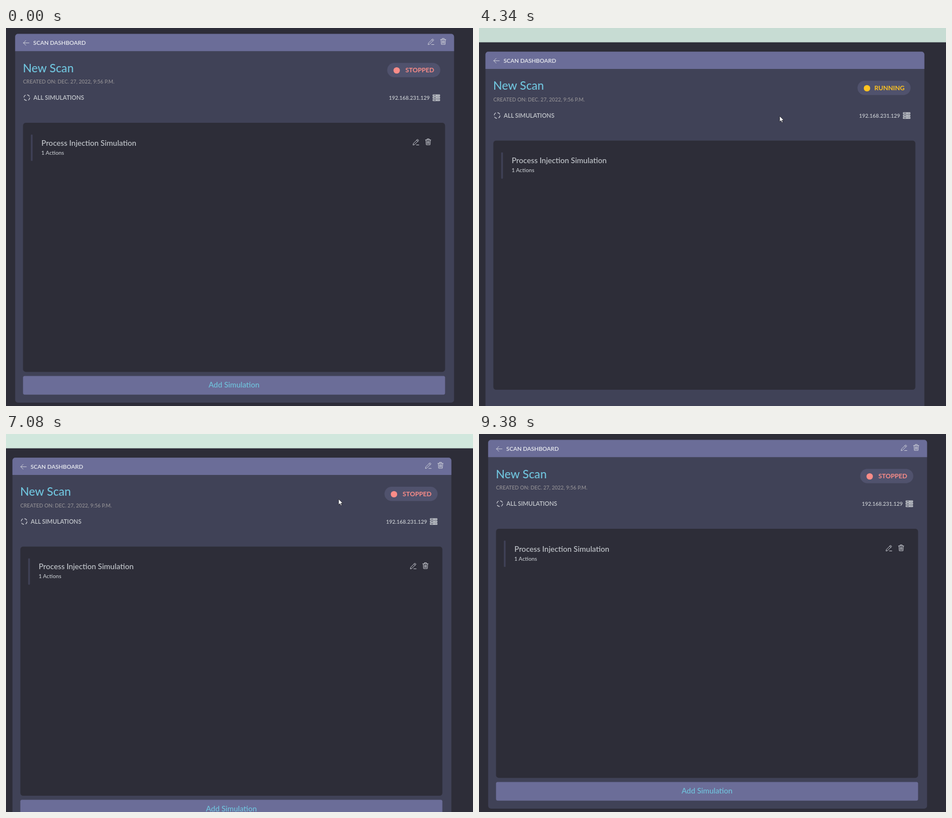
Recreate the animation shown at these times as an HTML page. Size 831 by 674 pixels, loop 9510 ms.

```html
<!DOCTYPE html>
<html lang="en">
<head>
<meta charset="utf-8">
<title>Scan dashboard</title>
<style>
  html, body { margin: 0; height: 100%; overflow: hidden; background: #2d2d38; }
  svg { display: block; width: 831px; height: 674px; }
  text { font: 500 10px Lato, "Open Sans", sans-serif; fill: #c5c9ce; }
  .label { font-weight: 600; }
  .accent { fill: #70c5de; }
  .end { text-anchor: end; }
  .line { fill: none; stroke: #d3d5dc; stroke-width: .9; stroke-linecap: round; stroke-linejoin: round; }
</style>
</head>
<body>
<svg viewBox="0 0 831 674">
  <defs>
    <g id="pencil" class="line">
      <path d="M0 10.5 .6 8 8 .6 10 2.6 2.6 10ZM6.5 2.1 8.5 4.1M6 10.7H10.3"/>
    </g>
    <g id="trash" class="line">
      <path d="M.5 2.4H10M3.4 2.2V.5H7.1V2.2M1.4 2.6 2 11H8.6L9.2 2.6M3.7 4.5V9M5.3 4.5V9M6.9 4.5V9"/>
    </g>
    <g id="tools">
      <use href="#pencil"/>
      <use href="#trash" x="21.5" y="-.6"/>
    </g>
    <g id="unit">
      <rect width="13" height="3.5" rx=".7" fill="#c5c9ce"/>
      <path d="M1.5 1.75H6M8.2 1.75H9.2M10.4 1.75H11.4" stroke="#404257"/>
    </g>
  </defs>

  <rect id="alert" width="831" height="25.5" fill="#d1e7dd"/>

  <g id="page">
    <rect x="16.3" y="10.5" width="781" height="657.5" rx="5" fill="#404257"/>
    <path d="M16.3 41.3V15.5a5 5 0 0 1 5-5H792.3a5 5 0 0 1 5 5V41.3Z" fill="#6b6d98"/>
    <path class="line" d="M41 26.6H31M35.3 22.3 31 26.6 35.3 30.9"/>
    <text class="label" x="48.6" y="30" style="font-size:10.2px;fill:#eceef2">SCAN DASHBOARD</text>

    <text class="accent" x="30" y="78.6" style="font-size:20.7px">New Scan</text>
    <text class="label" x="30.3" y="99.2" style="font-size:9.15px;fill:#8e8c91">CREATED ON: DEC. 27, 2022, 9:56 P.M.</text>
    <circle class="line" cx="37" cy="124.2" r="5.2" stroke-dasharray="5.2 2.97" style="stroke-width:1.2;stroke-linecap:butt"/>
    <text class="label" x="48.8" y="128" style="font-size:10.5px">ALL SIMULATIONS</text>
    <text class="label end" x="754" y="127.8" style="font-size:9.5px">192.168.231.129</text>
    <use href="#unit" x="759.3" y="118.4"/>
    <use href="#unit" x="759.3" y="122.6"/>
    <use href="#unit" x="759.3" y="126.8"/>

    <rect x="678.3" y="62.3" width="94.5" height="25.4" rx="12.7" fill="#50526d"/>
    <circle id="dot" cx="695.2" cy="75.6" r="5.7"/>
    <text id="status" class="end" x="762" y="79.4" style="font-size:11.4px;font-weight:700"></text>

    <rect x="30.3" y="169" width="751" height="444.3" rx="5" fill="#2d2d38"/>
    <rect x="44.3" y="190" width="3" height="47" rx="1" fill="#404257"/>
    <text x="63" y="209.5" style="font-size:13.65px">Process Injection Simulation</text>
    <text x="62.8" y="225.5" style="font-size:9.8px">1 Actions</text>

    <g id="controls">
      <use href="#tools" x="751.2" y="18.8"/>
      <use href="#tools" x="724.4" y="197.8"/>
      <rect x="30.3" y="620.5" width="751" height="33.3" rx="3" fill="#6b6d98"/>
      <text class="accent" x="405.8" y="641" text-anchor="middle" style="font-size:13.5px">Add Simulation</text>
    </g>
  </g>

  <path id="cursor" d="M0 0V10.3L2.4 8.1 4 11.7 5.7 11 4.2 7.5H7.4Z" fill="#fff" stroke="#15151c" stroke-width=".7"/>
</svg>
<script>
const LOOP = 9510;
const el = id => document.getElementById(id);

// Each alert appears at once, fades out, then collapses.
const alerts = [
  { show: 1230, fade: 4265, slide: 4765, end: 5265 },
  { show: 5800, fade: 8850, slide: 9015, end: 9330 }
];

// The cursor enters and leaves above the stage and rests between moves.
const entry = { x: 538, y: -13 };
const moves = [
  { from: 0, to: 750, x: 703, y: 83 },
  { from: 1160, to: 1300, x: 708, y: 86 },
  { from: 1560, to: 1700, x: 698, y: 86 },
  { from: 2490, to: 2910, x: 568, y: 139 },
  { from: 3920, to: 4340, x: 535, y: 157 },
  { from: 5200, to: 5740, x: 603, y: 108 },
  { from: 6880, to: 7570, x: 546, y: 149 },
  { from: 8030, to: 8710, x: 561, y: 88 },
  { from: 8880, to: 9380, ...entry }
];

// Eased progress from 0 to 1
const swing = (t, from, to) => {
  const p = Math.min(1, Math.max(0, (t - from) / (to - from)));
  return (1 - Math.cos(Math.PI * p)) / 2;
};

function cursorAt(t) {
  let { x, y } = entry;
  for (const move of moves) {
    const p = swing(t, move.from, move.to);
    x += (move.x - x) * p;
    y += (move.y - y) * p;
  }
  return [x, y];
}

function draw(t) {
  const active = alerts.find(a => t >= a.show && t < a.end);
  const open = active ? 1 - swing(t, active.slide, active.end) : 0;
  const opacity = active ? 1 - swing(t, active.fade, active.slide) : 0;
  const running = t >= alerts[0].show && t < alerts[1].show;
  const color = running ? "#ffc31f" : "#fa8c88";
  // The page recentres once its scrollbar is no longer needed.
  const shift = open > .08 ? -4.8 : 0;

  el("alert").setAttribute("opacity", opacity);
  el("page").setAttribute("transform", `translate(${shift} ${31.8 * open})`);
  el("controls").setAttribute("visibility", running ? "hidden" : "visible");
  el("dot").setAttribute("fill", color);
  el("status").style.fill = color;
  el("status").textContent = running ? "RUNNING" : "STOPPED";
  el("cursor").setAttribute("transform", `translate(${cursorAt(t)})`);
}

function tick() {
  draw(performance.now() % LOOP);
  requestAnimationFrame(tick);
}
tick();
</script>
</body>
</html>
```
